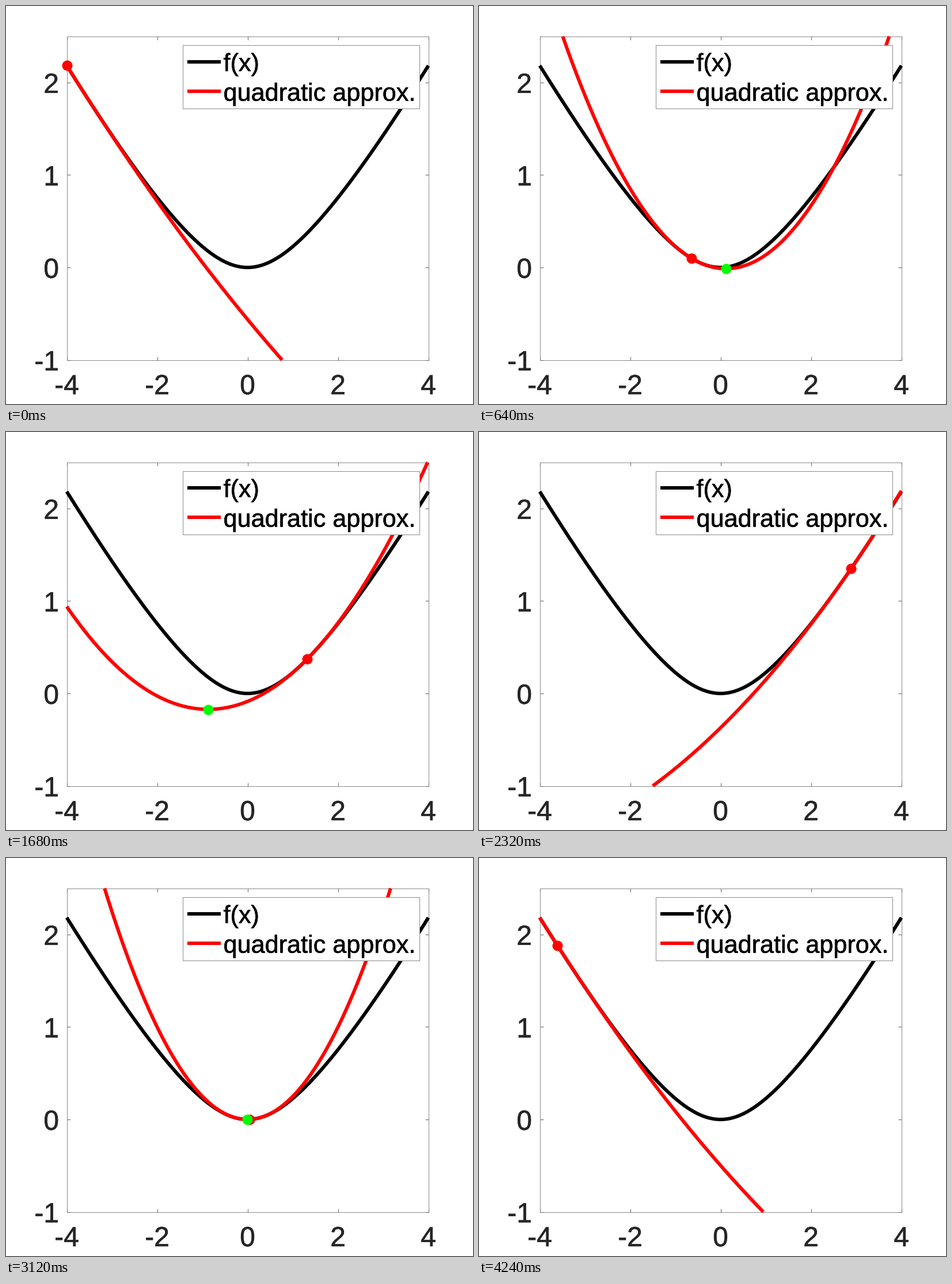
A matplotlib script for the animation above (4320 ms loop, 811 by 691 pixels).

```python
import numpy as np
import matplotlib.pyplot as plt
from matplotlib.animation import FuncAnimation
from matplotlib.patches import Rectangle
from matplotlib.patheffects import withStroke

W, H, DPI = 811, 691, 100
LEFT, RIGHT, TOP, BOTTOM = 105.5, 733.5, 52.5, 614.5
XMAX, YMIN, YMAX = 4, -1, 2.5
FRAMES, INTERVAL = 54, 80
HALF, STEP = FRAMES // 2, 0.075
PT = 72 / DPI  # points per pixel
INK, EDGE = "#262626", "#8a8a8a"
LINE = dict(lw=6 * PT, solid_capstyle="butt", solid_joinstyle="round")

plt.rcParams["font.family"] = "Liberation Sans"
plt.rcParams["text.hinting"] = "none"


def f(x):
    s = np.sqrt(1 + x**2)
    return s - np.log(1 + s) - 1 + np.log(2)


def derivatives(x):
    s = np.sqrt(1 + x**2)
    return x / (1 + s), 1 / (s * (1 + s))


def expansion_point(i):
    """Sweep right, then left, slowing quadratically around zero."""
    u = -1 + STEP * i if i < HALF else 1 - STEP * (i - HALF)
    return XMAX * u * abs(u)


fig = plt.figure(figsize=(W / DPI, H / DPI), dpi=DPI, facecolor="white")

ax = fig.add_axes([LEFT / W, 1 - BOTTOM / H, (RIGHT - LEFT) / W, (BOTTOM - TOP) / H])
ax.set(xlim=(-XMAX, XMAX), ylim=(YMIN, YMAX),
       xticks=range(-4, 5, 2), yticks=range(-1, 3))
ax.tick_params(direction="in", length=6 * PT, width=PT, color="#666666",
               top=True, right=True, labelbottom=False, labelleft=False)
for spine in ax.spines.values():
    spine.set(linewidth=PT, edgecolor=EDGE, zorder=1)

xs = np.linspace(-XMAX, XMAX, 4001)
ax.plot(xs, f(xs), color="black", clip_on=False, zorder=3, **LINE)
quad, = ax.plot([], [], color="red", clip_on=False, zorder=4, **LINE)


def dot(color, zorder):
    # A scatter keeps subpixel positions, unlike line markers.
    return ax.scatter([0], [0], s=(18 * PT)**2, color=color, lw=0,
                      clip_on=False, zorder=zorder)


point, minimum = dot("red", 5), dot("lime", 6)

# Labels and legend are laid out in pixels.
page = fig.add_axes([0, 0, 1, 1], zorder=2)
page.set(xlim=(0, W), ylim=(H, 0))
page.axis("off")


def label(x, y, text, size=48, color=INK, ha="center"):
    page.text(x, y, text, fontsize=size * PT, color=color, ha=ha, va="baseline",
              path_effects=[withStroke(linewidth=0.6 * PT, foreground=color)])


for v in range(-4, 5, 2):
    label(LEFT + (v + XMAX) / (2 * XMAX) * (RIGHT - LEFT), 674, str(v))
for v in range(-1, 3):
    y = BOTTOM - (v - YMIN) / (YMAX - YMIN) * (BOTTOM - TOP)
    label(92, y + 18, str(v), ha="right")

page.add_patch(Rectangle((306.5, 67.5), 411, 110, fc="white", ec=EDGE, lw=PT))
for y, color, text in ((96.5, "black", "f(x)"), (148, "red", "quadratic approx.")):
    page.plot([315, 373], [y, y], color=color, **LINE)
    label(377.5, y + 16.5, text, 43.2, "black", "left")


def update(i):
    x0 = expansion_point(i)
    slope, curve = derivatives(x0)
    xm = x0 - slope / curve
    ym = f(x0) - slope**2 / (2 * curve)
    ys = ym + curve / 2 * (xs - xm)**2
    quad.set_data(xs, np.where((ys >= YMIN) & (ys <= YMAX), ys, np.nan))
    point.set_offsets([(x0, f(x0))])
    minimum.set_offsets([(xm, ym)])
    minimum.set_visible(abs(xm) <= XMAX and ym >= YMIN)
    return quad, point, minimum


anim = FuncAnimation(fig, update, frames=FRAMES, interval=INTERVAL,
                     repeat=True, repeat_delay=0)
plt.show()
```
